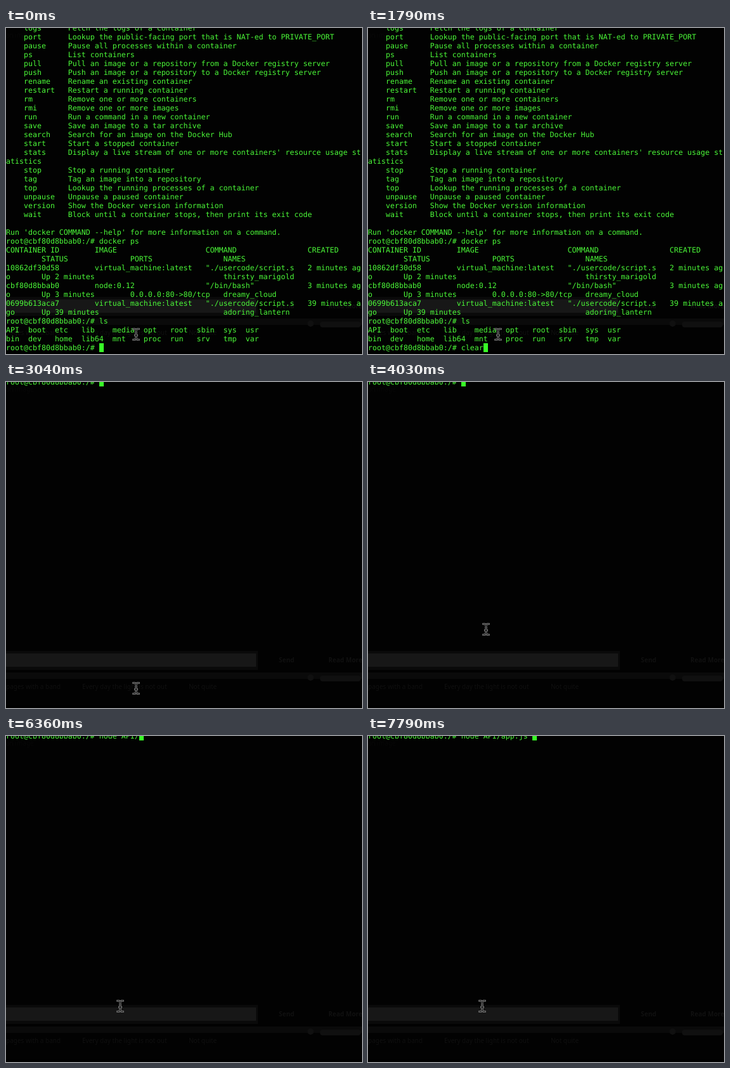
An HTML page that plays this animation: 561x514 px, repeating every 8 s.

```html
<!DOCTYPE html>
<html lang="en">
<head>
<meta charset="utf-8">
<title>Terminal</title>
<style>
  html, body { margin: 0; width: 100%; height: 100%; overflow: hidden; background: #020202; }
  #stage { position: relative; width: 561px; height: 514px; overflow: hidden; background: #020202; }
  #stage > * { position: absolute; }
  svg { left: 0; top: 0; }
  #screen {
    left: 0; top: -7px; margin: 0; color: #4bf838;
    font: 11.627px/14px "DejaVu Sans Mono", monospace;
    font-variant-ligatures: none; text-rendering: geometricPrecision;
  }
  #caret { left: 0; top: 0; width: 7px; height: 14px; background: #38fe27; }
  #pointer { left: -7px; top: -11px; }
</style>
</head>
<body>
<div id="stage">
  <svg width="561" height="514" font-family="Noto Sans, sans-serif" font-size="10">
    <rect y="424" width="397" height="30" fill="#0a0a0a"/>
    <rect y="428" width="394" height="21" rx="1" fill="#171717"/>
    <rect y="458" width="561" height="10" fill="#0a0a0a"/>
    <rect y="510" width="561" height="4" fill="#000"/>
    <g fill="#101010" style="filter: blur(.7px)">
      <circle cx="480" cy="466" r="5"/>
      <rect x="495" y="463" width="64" height="9" rx="4"/>
      <text x="430" y="442" font-weight="700">Send</text>
      <text x="508" y="442" font-weight="700">Read More</text>
      <text x="0" y="484">pages with a band</text>
      <text x="120" y="484">Every day the light is not out</text>
      <text x="288" y="484">Not quite</text>
      <text x="0" y="15" fill="#080808">an image</text>
    </g>
  </svg>
  <pre id="screen"></pre>
  <div id="caret"></div>
  <svg id="pointer" width="14" height="22" fill="none" stroke-linecap="square">
    <path id="beam" d="M3 2.5H5L7 4.5L9 2.5H11M7 4.5V17.5M3 19.5H5L7 17.5L9 19.5H11M5.5 12.5H8.5" stroke="#747474" stroke-width="3"/>
    <use href="#beam" style="stroke: #050505"/>
    <path d="M3 2.5H5L7 4.5L9 2.5H11M7 4.5V17.5M3 19.5H5L7 17.5L9 19.5H11M5.5 12.5H8.5" stroke="#0a0a0a" stroke-width="1"/>
  </svg>
</div>
<script>
const LOOP = 8000, CELL = 7, LINE = 14, TOP = -7;
const PROMPT = 'root@cbf80d8bbab0:/# ';

const help = `logs|Fetch the logs of a container
port|Lookup the public-facing port that is NAT-ed to PRIVATE_PORT
pause|Pause all processes within a container
ps|List containers
pull|Pull an image or a repository from a Docker registry server
push|Push an image or a repository to a Docker registry server
rename|Rename an existing container
restart|Restart a running container
rm|Remove one or more containers
rmi|Remove one or more images
run|Run a command in a new container
save|Save an image to a tar archive
search|Search for an image on the Docker Hub
start|Start a stopped container
stats|Display a live stream of one or more containers' resource usage statistics
stop|Stop a running container
tag|Tag an image into a repository
top|Lookup the running processes of a container
unpause|Unpause a paused container
version|Show the Docker version information
wait|Block until a container stops, then print its exit code`
  .split('\n').map(row => {
    const [name, text] = row.split('|');
    return '    ' + name.padEnd(10) + text;
  });

const columns = (widths, rows) => rows.map(row =>
  row.split('|').map((cell, i) => cell.padEnd(widths[i])).join('').trimEnd());

const containers = columns([20, 25, 23, 20, 20, 21, 0], [
  'CONTAINER ID|IMAGE|COMMAND|CREATED|STATUS|PORTS|NAMES',
  '10862df30d58|virtual_machine:latest|"./usercode/script.s|2 minutes ago|Up 2 minutes||thirsty_marigold',
  'cbf80d8bbab0|node:0.12|"/bin/bash"|3 minutes ago|Up 3 minutes|0.0.0.0:80->80/tcp|dreamy_cloud',
  '0699b613aca7|virtual_machine:latest|"./usercode/script.s|39 minutes ago|Up 39 minutes||adoring_lantern'
]);

const listing = columns([5, 6, 6, 7, 7, 6, 6, 6, 5, 0], [
  'API|boot|etc|lib|media|opt|root|sbin|sys|usr',
  'bin|dev|home|lib64|mnt|proc|run|srv|tmp|var'
]);

// Terminal lines wrap at 80 columns.
const wrap = line => line.match(/.{1,80}/g) || [''];
const history = [
  ...help, '', "Run 'docker COMMAND --help' for more information on a command.",
  PROMPT + 'docker ps', ...containers,
  PROMPT + 'ls', ...listing
].flatMap(wrap);

// [time, typed text, caret visible]
const typing = [
  [0, '', 1], [530, '', 0], [1070, '', 1], [1160, 'c', 1], [1250, 'cl', 1],
  [1340, 'cle', 1], [1610, 'clea', 1], [1790, 'clear', 1],
  [1960, '', 1], [2500, '', 0], [3040, '', 1], [3580, '', 0], [4030, '', 1], [4560, '', 0],
  [4740, 'no', 1], [4830, 'nod', 1], [4920, 'node', 1], [5010, 'node ', 1], [5550, 'node ', 0],
  [6000, 'node A', 1], [6090, 'node AP', 1], [6360, 'node API/', 1],
  [6810, 'node API/a', 1], [6900, 'node API/ap', 1], [6990, 'node API/app', 1],
  [7080, 'node API/app.', 1], [7620, 'node API/app', 1], [7790, 'node API/app.js ', 1]
];
const CLEARED = 1960;

// [time, x, y]
const moves = [
  [0, 205, 483], [3850, 202, 456], [3940, 194, 415],
  [4030, 186, 390], [4120, 182, 413], [4200, 180, 426]
];

const at = (steps, t) => steps.findLast(step => step[0] <= t);
const [screen, caret, pointer] =
  ['screen', 'caret', 'pointer'].map(id => document.getElementById(id));
const place = (el, x, y) => el.style.transform = `translate(${x}px, ${y}px)`;
let shown = '';

function draw(now) {
  const t = now % LOOP;
  const [, typed, visible] = at(typing, t);
  const lines = t < CLEARED ? history : [];
  const text = [...lines, PROMPT + typed].join('\n');
  if (text !== shown) screen.textContent = shown = text;
  caret.style.visibility = visible ? 'visible' : 'hidden';
  place(caret, (PROMPT + typed).length * CELL, TOP + lines.length * LINE);
  const [, x, y] = at(moves, t);
  place(pointer, x, y);
}

const start = performance.now();
function tick() {
  draw(performance.now() - start);
  requestAnimationFrame(tick);
}
tick();
</script>
</body>
</html>
```
